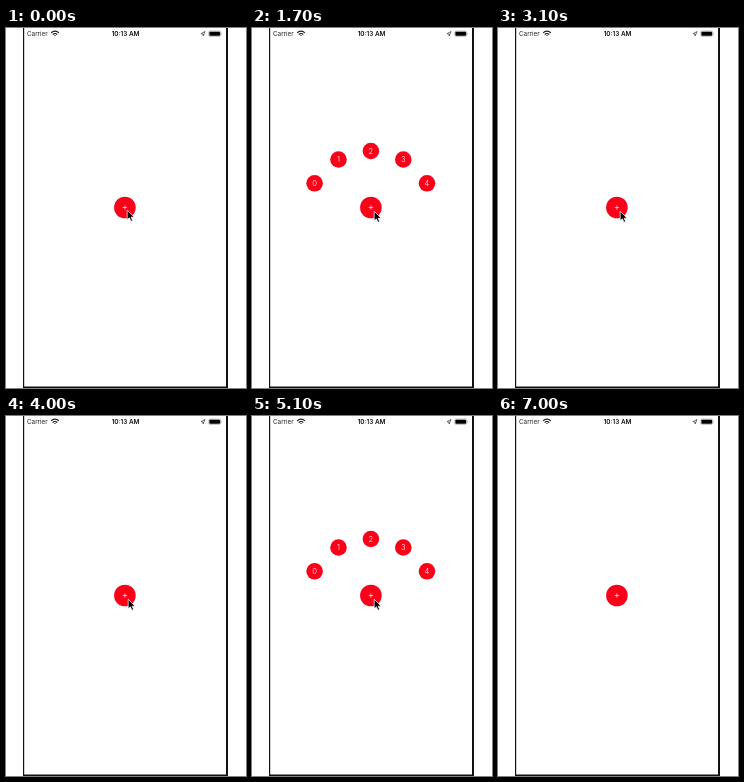
Write an HTML page that moves like this. It is 240 by 360 pixels and loops after 8000 ms.

```html
<!DOCTYPE html>
<html lang="en">
<head>
<meta charset="utf-8">
<title>Radial menu</title>
<style>
  html, body { margin: 0; width: 100%; height: 100%; overflow: hidden; background: #fff; }
  svg { display: block; width: 100%; height: 100%; }
  text { font-family: Inter, Roboto, sans-serif; }
  .item text { font-size: 7.6px; font-weight: 300; fill: #fff; text-anchor: middle; }
  .red { fill: #fb0019; }
</style>
</head>
<body>
<svg viewBox="0 0 240 360">
  <!-- device edge -->
  <path d="M17 0h1.2v358.6h201.8V0h2v360H17z" fill="#111"/>

  <!-- status bar -->
  <text x="21" y="8" font-size="6.3" fill="#222">Carrier</text>
  <g fill="none" stroke="#111" stroke-width="1.2">
    <path d="M45.2 4.8q3.8-3.2 7.6 0M46.7 6.5q2.3-2 4.6 0"/>
    <path d="M48.1 7.1h1.8l-.9 1.1z" fill="#111" stroke="none"/>
  </g>
  <text x="119.6" y="8.1" font-size="6.4" font-weight="600" fill="#111" text-anchor="middle">10:13 AM</text>
  <path d="M199 3.5l-4 2.2 1.9.3.3 2z" fill="none" stroke="#333" stroke-width=".7"/>
  <rect x="202.8" y="3.1" width="11.8" height="5.2" rx="1.2" fill="none" stroke="#777" stroke-width=".5"/>
  <rect x="203.4" y="3.7" width="10.6" height="4" rx=".7" fill="#000"/>
  <path d="M215.3 4.9v1.6" stroke="#777" stroke-width=".6"/>

  <!-- menu -->
  <g transform="translate(118.9 179.5)">
    <g id="items"></g>
    <circle class="red" r="10.8"/>
    <path d="M-2.2 0h4.4M0-2.2v4.4" stroke="#fff" stroke-width=".65"/>
  </g>

  <path id="cursor" d="M0 0v9.6l2.2-2 1.5 3.5 1.7-.8-1.5-3.3h3z" fill="#000" stroke="#fff" stroke-width=".7"/>
</svg>
<script>
const LOOP = 8000, STEP = 100;
const FAR = 7 / 6, NEAR = 11 / 12;
const SPOTS = [[-56.3, -24.2], [-32.4, -48], [0, -56.5], [32.4, -48], [56.1, -24.2]];
const CYCLES = [{ open: 673, close: 2205 }, { open: 4042, close: 5508 }];
const CURSOR = [[0, 121.2, 182.2], [100, 122.2, 183.2], [6600, 142, 146], [6700, 190, 16]];

const clamp = v => Math.min(1, Math.max(0, v));

// Evenly spaced keyframes, linear in between.
function track(values, p) {
  const x = clamp(p) * (values.length - 1);
  const i = Math.min(Math.floor(x), values.length - 2);
  return values[i] + (values[i + 1] - values[i]) * (x - i);
}

// Distance from the button (1 = resting place) and label angle.
function menuAt(t) {
  const cycle = CYCLES.filter(c => t >= c.open).pop();
  if (!cycle) return { reach: 0, angle: 0 };
  const closing = t - cycle.close, opening = t - cycle.open;
  if (closing >= 0) return {
    reach: track([1, FAR, 0], closing / 500),
    angle: 360 * (clamp(closing / 400) - clamp((closing - 400) / 100))
  };
  return {
    reach: track([0, FAR, NEAR, 1], opening / 500),
    angle: 360 * clamp(opening / 1000)
  };
}

const cursor = document.getElementById('cursor');
const holder = document.getElementById('items');
holder.innerHTML = SPOTS.map((_, i) =>
  `<g class="item"><circle class="red" r="8.3"/><text y="2.75">${i}</text></g>`).join('');
const items = [...holder.children];

function draw(t) {
  const { reach, angle } = menuAt(t);
  items.forEach((item, i) => {
    const [x, y] = SPOTS[i];
    item.setAttribute('transform', `translate(${x * reach} ${y * reach}) rotate(${angle})`);
  });
  holder.style.display = reach > 0 ? '' : 'none';

  const [, x, y] = CURSOR.filter(([start]) => t >= start).pop();
  cursor.setAttribute('transform', `translate(${x} ${y})`);
  cursor.style.display = t < 6800 ? '' : 'none';
}

const begin = performance.now();
function tick() {
  const t = Math.max(0, performance.now() - begin) % LOOP;
  draw(Math.floor(t / STEP) * STEP);
  requestAnimationFrame(tick);
}
tick();
</script>
</body>
</html>
```
